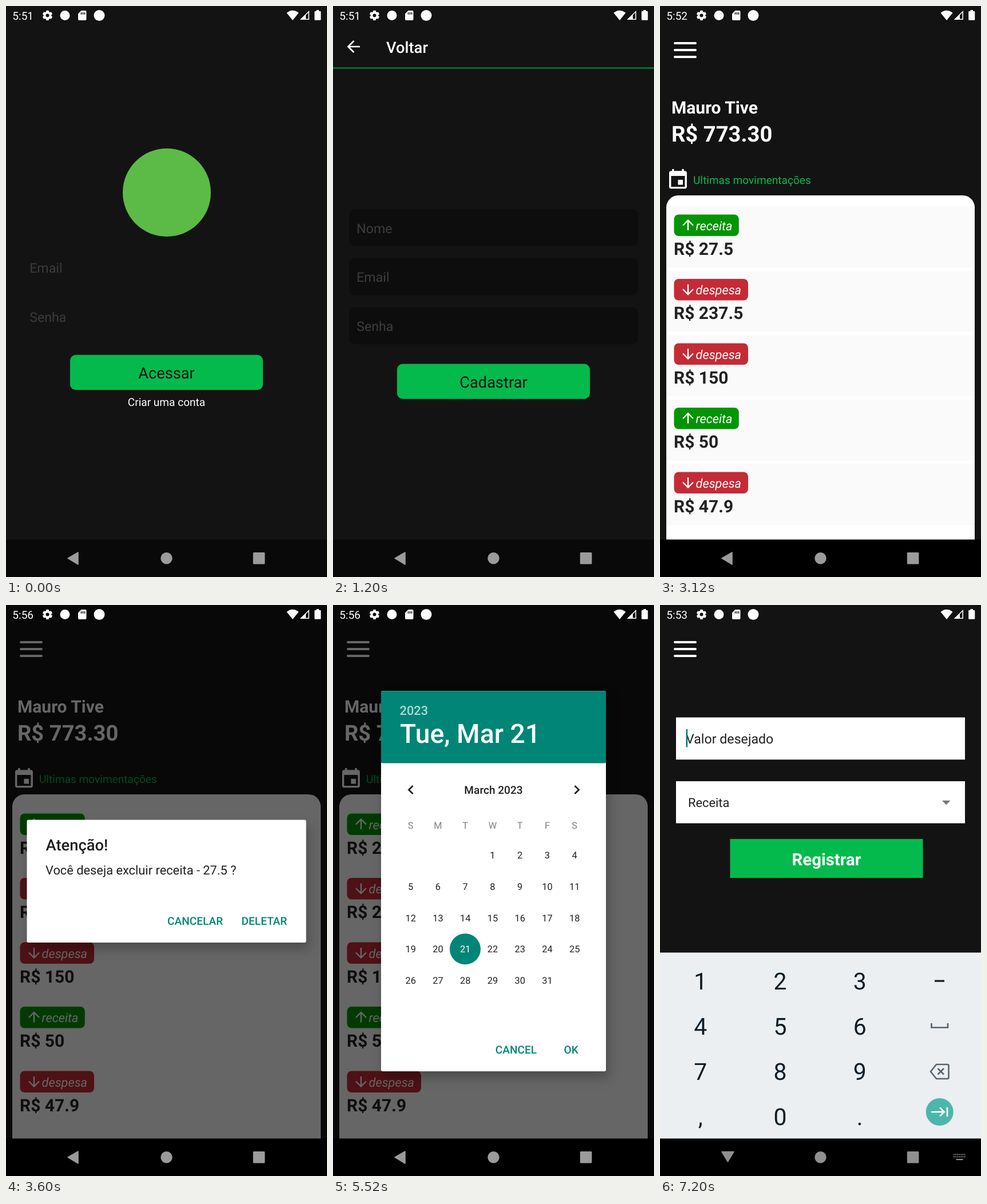
These frames come from a looping animation (561 px wide and 998 px high, 8000 ms). An HTML page:

```html
<!DOCTYPE html>
<html lang="pt">
<head>
<meta charset="utf-8">
<title>Finance app tour</title>
<style>
html, body { margin: 0; width: 100%; height: 100%; overflow: hidden; background: #131313; }
svg { display: block; width: 100vw; height: 100vh; font-family: Roboto, "Noto Sans", sans-serif; }
text { white-space: pre; text-rendering: geometricPrecision; }
.lift { filter: drop-shadow(4px 11px 10px rgba(0, 0, 0, .25)); }
</style>
</head>
<body>
<svg id="stage" viewBox="0 0 561 998" preserveAspectRatio="none"></svg>
<script>
const DP = 561 / 411.43;
const BG = '#131313', GREEN = '#04ba4d', RED = '#c42b36', TEAL = '#008577', INK = '#212121';
const USER = 'Mauro Tive';

const text = (s, x, y, dp, fill = '#fff', weight = 400, more = '') =>
  `<text x="${x}" y="${y}" font-size="${(dp * DP).toFixed(2)}" font-weight="${weight}" fill="${fill}" ${more}>${s}</text>`;
const mid = (s, x, y, dp, fill, weight) => text(s, x, y, dp, fill, weight, 'text-anchor="middle"');
const rect = (x, y, w, h, fill, r = 0, more = '') =>
  `<rect x="${x}" y="${y}" width="${w}" height="${h}" rx="${r}" fill="${fill}" ${more}/>`;
const disc = (x, y, r, fill) => `<circle cx="${x}" cy="${y}" r="${r}" fill="${fill}"/>`;
const shape = (d, fill) => `<path d="${d}" fill="${fill}"/>`;
const line = (d, stroke, w, cap = 'butt') =>
  `<path d="${d}" fill="none" stroke="${stroke}" stroke-width="${w}" stroke-linecap="${cap}"/>`;

function status(clock) {
  return text(clock, 11.3, 24, 14) +
    '<g fill="none" stroke="#fff"><circle cx="72.5" cy="16.5" r="5" stroke-width="4"/>' +
    '<circle cx="72.5" cy="16.5" r="7.4" stroke-width="2.6" pathLength="12" stroke-dasharray="1.2 .8" stroke-dashoffset="-.4"/></g>' +
    disc(103, 16.5, 8.5, '#fff') +
    shape('M131.5 8H138.500a2 2 0 0 1 2 2V23a2 2 0 0 1-2 2H128a2 2 0 0 1-2-2V13.500z', '#fff') +
    line('M131.5 11v4M134.5 11v4M137.5 11v4', BG, 1.5) +
    disc(163, 16.5, 9.5, '#fff') +
    shape('M490.5 12Q501 3.5 511.5 12L501 25z', '#fff') +
    line('M515.5 23.3H529.2V9.8z', '#fff', 1.5) +
    shape('M514 24L524 14.5V24z', '#fff') +
    shape('M542.5 9V7H547V9H549a1.3 1.3 0 0 1 1.3 1.3V23.5a1.3 1.3 0 0 1-1.3 1.3H540.5a1.3 1.3 0 0 1-1.3-1.3V10.3a1.3 1.3 0 0 1 1.3-1.3z', '#fff');
}

function nav(fill, tint = '#9b9b9b', typing = false) {
  let keys = '';
  if (typing) {
    for (let i = 0; i < 7; i++) keys += rect(513 + 3.1 * i, 959.5, 1.9, 1.9, tint) + rect(513 + 3.1 * i, 963.5, 1.9, 1.9, tint);
    keys += rect(517.5, 968, 12, 2.2, tint);
  }
  const back = typing ? 'M108 955.5H129L118.5 973z' : 'M126 955V976L108.2 965.3z';
  return rect(0, 932.5, 561, 65.5, fill) +
    `<path d="${back}" fill="${tint}" stroke="${tint}" stroke-width="1.6" stroke-linejoin="round"/>` +
    disc(280.5, 965.3, 10.2, tint) + rect(431.8, 955, 20.6, 20.6, tint, 1.5) + keys;
}

const burger = line('M26 65H62M26 77H62M26 89H62', '#fff', 4, 'round');
const field = (s, y, hint) => text(s, 41.2, y, 17, hint);
const button = (s, y) => rect(112, y, 337, 61.3, GREEN, 10) + mid(s, 280.5, y + 41.3, 20, '#111');

function login() {
  return disc(281, 326, 77, '#5cbb47') +
    field('Email', 466.3, '#3b3b3b') + field('Senha', 552.3, '#3b3b3b') +
    button('Acessar', 609.8) + mid('Criar uma conta', 280.5, 698.8, 14) + nav('#090909');
}

function signup() {
  const rows = ['Nome', 'Email', 'Senha'].map((s, i) =>
    rect(28, 355 + 85.6 * i, 505, 65, '#0d0d0d', 10) + field(s, 396.8 + 85.6 * i, '#3d3d3d')).join('');
  return line('M47 71H27M36.5 61L26.5 71L36.5 81', '#fff', 2.7) +
    text('Voltar', 93, 81.5, 20, '#fff', 500) + rect(0, 107.4, 561, 2, '#04943f') +
    rows + button('Cadastrar', 625.5) + nav('#090909');
}

const moves = [[1, 27.5], [0, 237.5], [0, 150], [1, 50], [0, 47.9]];
const panel = 'M11 933V352a21 21 0 0 1 21-21H529a21 21 0 0 1 21 21V933z';
const cardBox = (i, fill) => rect(11, 350.5 + 112.5 * i, 539, 106.5, fill);

function card([income, value], i) {
  const arrow = income ? 'M49 392V375M40 383.5L49 374.5L58 383.5' : 'M49 374V391M40 382.5L49 391.5L58 382.5';
  return `<g transform="translate(0 ${112.5 * i})">` +
    rect(24.5, 364.5, income ? 113.3 : 129.5, 37.5, income ? '#049404' : RED, 8) +
    line(arrow, '#fff', 2.4) +
    text(income ? 'receita' : 'despesa', 62.5, 391.7, 16, '#fff', 400, 'font-style="italic"') +
    text('R$ ' + value, 24, 434.5, 22, '#222', 700) + '</g>';
}

function home(cardFill) {
  const event = 'M17 12h-5v5h5v-5zM16 1v2H8V1H6v2H5c-1.110 0-1.990.9-1.990 2L3 19c0 1.100.89 2 2 2h14c1.100 0 2-.9 2-2V5c0-1.100-.9-2-2-2h-1V1h-2zm3 18H5V8h14v11z';
  return burger + text(USER, 20, 188, 22, '#fff', 700) + text('R$ 773.30', 20, 237, 28, '#fff', 700) +
    `<g transform="translate(10.8 283.2) scale(1.72)">${shape(event, '#fff')}</g>` +
    text('Ultimas movimentações', 58, 311, 14, GREEN) +
    shape(panel, '#fff') + moves.map((m, i) => cardBox(i, cardFill) + card(m, i)).join('');
}

const dimmed = box => home('#fff') + rect(0, 0, 561, 998, '#000', 0, 'opacity=".6"') + box + nav('#000');
const action = (s, x, y) => text(s, x, y, 14, TEAL, 500);

function confirmBox() {
  return rect(36.5, 375.5, 488, 214.5, '#fff', 2.7, 'class="lift"') +
    text('Atenção!', 69.6, 428.7, 20, INK, 500) +
    text('Você deseja excluir receita - 27.5 ?', 69, 471, 16, INK) +
    action('CANCELAR', 282, 558.7) + action('DELETAR', 411.6, 558.7);
}

function datePicker() {
  const col = i => 135.7 + 47.75 * i;
  let s = rect(84, 150.3, 393, 664.7, '#fff', 2.7, 'class="lift"') +
    rect(84, 150.3, 393, 126.2, TEAL, 2) +
    text('2023', 116.5, 192, 16, '#b3dad6', 500) + text('Tue, Mar 21', 117, 241, 34, '#fff', 500) +
    line('M139.5 316L132.5 323L139.5 330M422.5 316L429.5 323L422.5 330', INK, 2.8) +
    mid('March 2023', 280.5, 329.7, 14, INK, 500) + disc(231, 601.3, 27, TEAL);
  [...'SMTWTFS'].forEach((d, i) => s += mid(d, col(i), 391.3, 12, '#808080'));
  for (let d = 1; d <= 31; d++) {
    const cell = d + 2;
    s += mid(d, col(cell % 7), 443.3 + 54.6 * Math.floor(cell / 7), 12, d === 21 ? '#fff' : INK);
  }
  return s + action('CANCEL', 283.8, 783.5) + action('OK', 403.5, 783.5);
}

function drawer() {
  const items = [['Home', 268, GREEN, '#fff'], ['Registrar', 343.3, '#030303', '#ddd'],
    ['Perfil', 419, '#030303', '#ddd'], ['Sair', 493, RED, '#fff']];
  return rect(0, 0, 561, 933, '#010101') + shape(panel, '#808080') +
    moves.map((m, i) => cardBox(i, '#7e7e7e')).join('') +
    rect(0, 0, 561, 33, '#181818') + rect(0, 0, 381.8, 933, '#181818') +
    disc(191, 110, 47, '#5cbb47') + mid('Bem vindo,', 191.5, 201, 18) + mid(USER, 191, 233.7, 17, '#fff', 700) +
    items.map(([s, y, fill, ink]) => rect(13.3, y, 355, 61.8, fill, 5) + text(s, 24, y + 38.5, 14.3, ink, 700)).join('') +
    nav('#010101');
}

function register() {
  const dark = '#0b1d26', soft = '#56656d';
  let s = burger + rect(28, 196.5, 505, 73.7, '#fff') + text('Valor desejado', 45, 241.7, 17, INK) +
    rect(45.5, 217, 2.7, 31.5, TEAL) +
    rect(28, 308, 505, 73.5, '#fff') + text('Receita', 49, 353.3, 16, INK) +
    shape('M493 341.8H507.5L500.2 349.3z', '#757575') +
    rect(122.5, 409, 337, 68, GREEN) + mid('Registrar', 291, 454.7, 21.5, '#fff', 700) +
    rect(0, 607.5, 561, 325.5, '#ebeff2');
  [...'123456789,0.'].forEach((k, i) =>
    s += mid(k, 70.8 + 139.2 * (i % 3), 671.7 + 79 * Math.floor(i / 3), 30, dark));
  return s + rect(480, 655.5, 17, 3.2, dark) +
    line('M474.5 731V738.5H503V731', soft, 2.7) +
    line('M483 803H502.5a2 2 0 0 1 2 2V826a2 2 0 0 1-2 2H483L473 815.5zM485.5 810L496 820.5M496 810L485.5 820.5', soft, 2.6) +
    disc(488.7, 886, 24, '#4db6ac') +
    line('M474 886H496.5M489 878.5L496.5 886L489 893.5M502 878V894', '#fff', 2.7) +
    nav('#000', '#8f8f8f', true);
}

const STEP = 1200, LOOP = 8000;
const scenes = [
  ['5:51', login()], ['5:51', signup()], ['5:52', home('#fafafa') + nav('#000')],
  ['5:56', dimmed(confirmBox())], ['5:56', dimmed(datePicker())],
  ['5:52', drawer()], ['5:53', register()]
];

const stage = document.getElementById('stage');
stage.innerHTML = scenes.map(([clock, body]) =>
  `<g display="none">${rect(0, 0, 561, 998, BG)}${body}${status(clock)}</g>`).join('');
const layers = [...stage.children];

function draw(ms) {
  const now = Math.floor((ms % LOOP) / STEP);
  layers.forEach((g, i) => g.setAttribute('display', i === now ? 'inline' : 'none'));
}

const start = performance.now();
function tick() {
  draw(performance.now() - start);
  requestAnimationFrame(tick);
}
tick();
</script>
</body>
</html>
```
